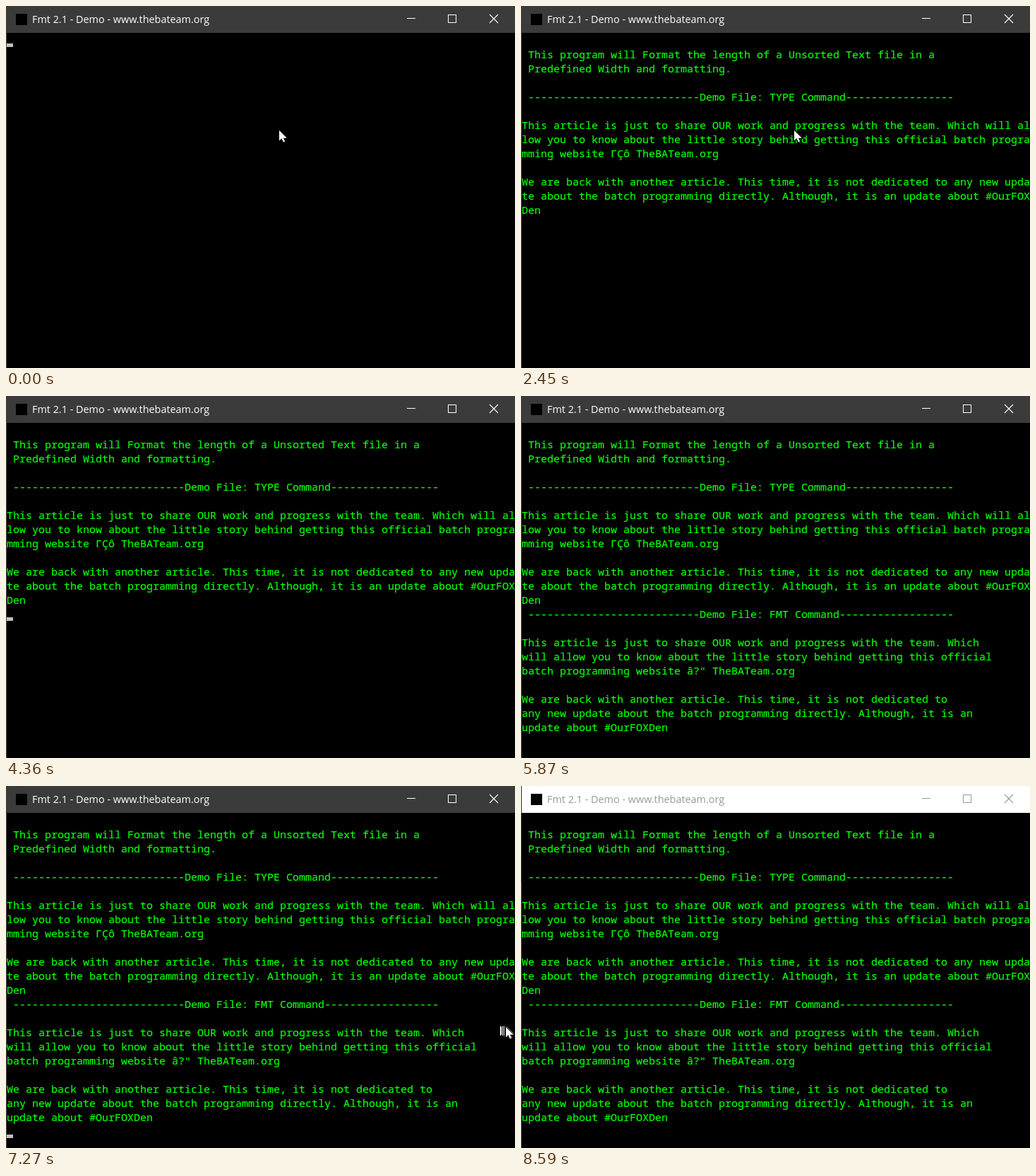
An HTML page that plays this animation: 721 by 512 pixels, repeating every 8720 ms.

```html
<!DOCTYPE html>
<html lang="en">
<head>
<meta charset="utf-8">
<title>Console demo</title>
<style>
  html, body { margin: 0; width: 100%; height: 100%; overflow: hidden; background: #000; }
  #stage { position: relative; width: 721px; height: 512px; overflow: hidden; background: #000; }
  #stage > * { position: absolute; margin: 0; }
  #bar { left: 0; top: 0; width: 721px; height: 38px; background: #3b3b3b; color: #fff; }
  #bar span { position: absolute; left: 37px; font: 14.4px/37px "Open Sans", sans-serif; white-space: pre; }
  #bar i { position: absolute; left: 14px; top: 11px; width: 16px; height: 16px; background: #000; }
  #bar svg { position: absolute; left: 0; top: 0; }
  #edge { left: 0; top: 38px; width: 1px; height: 474px; background: #4a4a4a; }
  #desktop { left: 0; top: 0; width: 1px; height: 136px; background: #16304a; }
  .inactive #bar { background: #fff; color: #999; }
  #stage:not(.inactive) #desktop { display: none; }
  #screen { left: 1px; top: 38px; color: #0f0; font: 15px/20px "Noto Sans Mono", monospace;
    font-variant-ligatures: none; white-space: pre; -webkit-text-stroke: .2px; }
  #caret { left: 1px; width: 9px; height: 5px; background: #c0c0c0; }
</style>
</head>
<body>
<div id="stage">
  <div id="bar">
    <i></i><span>Fmt 2.1 - Demo - www.thebateam.org</span>
    <svg width="721" height="38" fill="none" stroke="currentColor">
      <path d="M568 17.5h12M626.5 12.5h11v11h-11z" shape-rendering="crispEdges"/>
      <path d="M685 12l12 12M697 12l-12 12" stroke-width="1.1"/>
    </svg>
  </div>
  <div id="edge"></div>
  <div id="desktop"></div>
  <pre id="screen"></pre>
  <div id="caret"></div>
  <svg id="pointers" width="721" height="512"></svg>
</div>
<script>
const LOOP = 8720, STEP = 70, BLINK = 460, TRAIL = 7, TRAIL_GAP = 16;
const $ = id => document.getElementById(id);

const heading = (name, tail) =>
  ' ' + '-'.repeat(27) + `Demo File: ${name} Command` + '-'.repeat(tail);

const intro = `
 This program will Format the length of a Unsorted Text file in a
 Predefined Width and formatting.

${heading('TYPE', 17)}
`;
const typed = `
This article is just to share OUR work and progress with the team. Which will al
low you to know about the little story behind getting this official batch progra
mming website ΓÇô TheBATeam.org

We are back with another article. This time, it is not dedicated to any new upda
te about the batch programming directly. Although, it is an update about #OurFOX
Den
`;
const formatted = `${heading('FMT', 18)}

This article is just to share OUR work and progress with the team. Which
will allow you to know about the little story behind getting this official
batch programming website â?" TheBATeam.org

We are back with another article. This time, it is not dedicated to
any new update about the batch programming directly. Although, it is an
update about #OurFOXDen
`;

// The caret sits below each output and starts to blink at caretFrom.
const outputs = [
  { start: 0, text: '', caretFrom: -260 },
  { start: 860, text: intro, caretFrom: 1590 },
  { start: 930, text: intro + typed, caretFrom: 1590 },
  { start: 4620, text: intro + typed + formatted, caretFrom: 5210 },
];

// Key points of the pointer's wandering: [time, x, y]
const path = [
  [0, 387, 176], [2650, 387, 176], [3034, 589, 372], [3130, 628, 424],
  [3500, 669, 500], [3700, 669, 530], [5790, 668, 530], [6150, 648, 360],
  [6530, 650, 166], [6614, 674, 172], [6662, 692, 190], [6694, 691, 208],
  [6710, 677, 233], [6900, 628, 330], [7250, 709, 340], [7560, 634, 362],
  [7836, 623, 413], [7868, 641, 354], [7900, 683, 329], [8200, 694, 430],
  [8420, 670, 530],
];

// Smooth (cubic Hermite) curve through the key points.
function pointerAt(t) {
  const at = i => path[Math.max(0, Math.min(path.length - 1, i))];
  const i = path.findLastIndex(key => t >= key[0]);
  if (i < 0 || i === path.length - 1) return at(i).slice(1);
  const [before, from, to, after] = [at(i - 1), at(i), at(i + 1), at(i + 2)];
  const span = to[0] - from[0], k = (t - from[0]) / span;
  return [1, 2].map(axis => {
    const slope = (a, b) => (b[axis] - a[axis]) / (b[0] - a[0]) * span;
    const ease = k * k * (3 - 2 * k);
    return Math.round(from[axis] + (to[axis] - from[axis]) * ease
      + slope(before, to) * k * (1 - k) ** 2
      - slope(from, after) * k * k * (1 - k));
  });
}

// The pointer moves in steps of equal length.
function stepped(t) {
  const start = t < 5870 ? 2710 : 5870;
  return t < 2710 ? 0 : start + Math.floor((t - start) / STEP) * STEP;
}

const arrows = Array.from({ length: TRAIL }, () => {
  const arrow = document.createElementNS('http://www.w3.org/2000/svg', 'path');
  arrow.setAttribute('d', 'M0 0V14.5L3.4 11.2 5.8 16.6 8.2 15.6 5.9 10.8H10.8Z');
  arrow.setAttribute('style', 'fill:#fff;stroke:#000;stroke-width:2;paint-order:stroke');
  return $('pointers').appendChild(arrow);
});

function draw(t) {
  const { text, caretFrom } = outputs.findLast(output => t >= output.start);
  if ($('screen').textContent !== text) $('screen').textContent = text;

  const caret = $('caret').style;
  const row = text.split('\n').length - 1;
  const blink = Math.floor((t - caretFrom) / BLINK);
  caret.top = 53 + row * 20 + 'px';
  caret.visibility = blink >= 0 && blink % 2 === 0 ? 'visible' : 'hidden';

  const now = stepped(t);
  arrows.forEach((arrow, i) => {
    const [x, y] = pointerAt(now - (TRAIL - 1 - i) * TRAIL_GAP);
    arrow.setAttribute('transform', `translate(${x} ${y})`);
  });

  $('stage').classList.toggle('inactive', t >= 8590);
}

const begin = performance.now();
function tick() {
  draw((performance.now() - begin) % LOOP);
  requestAnimationFrame(tick);
}
tick();
</script>
</body>
</html>
```
